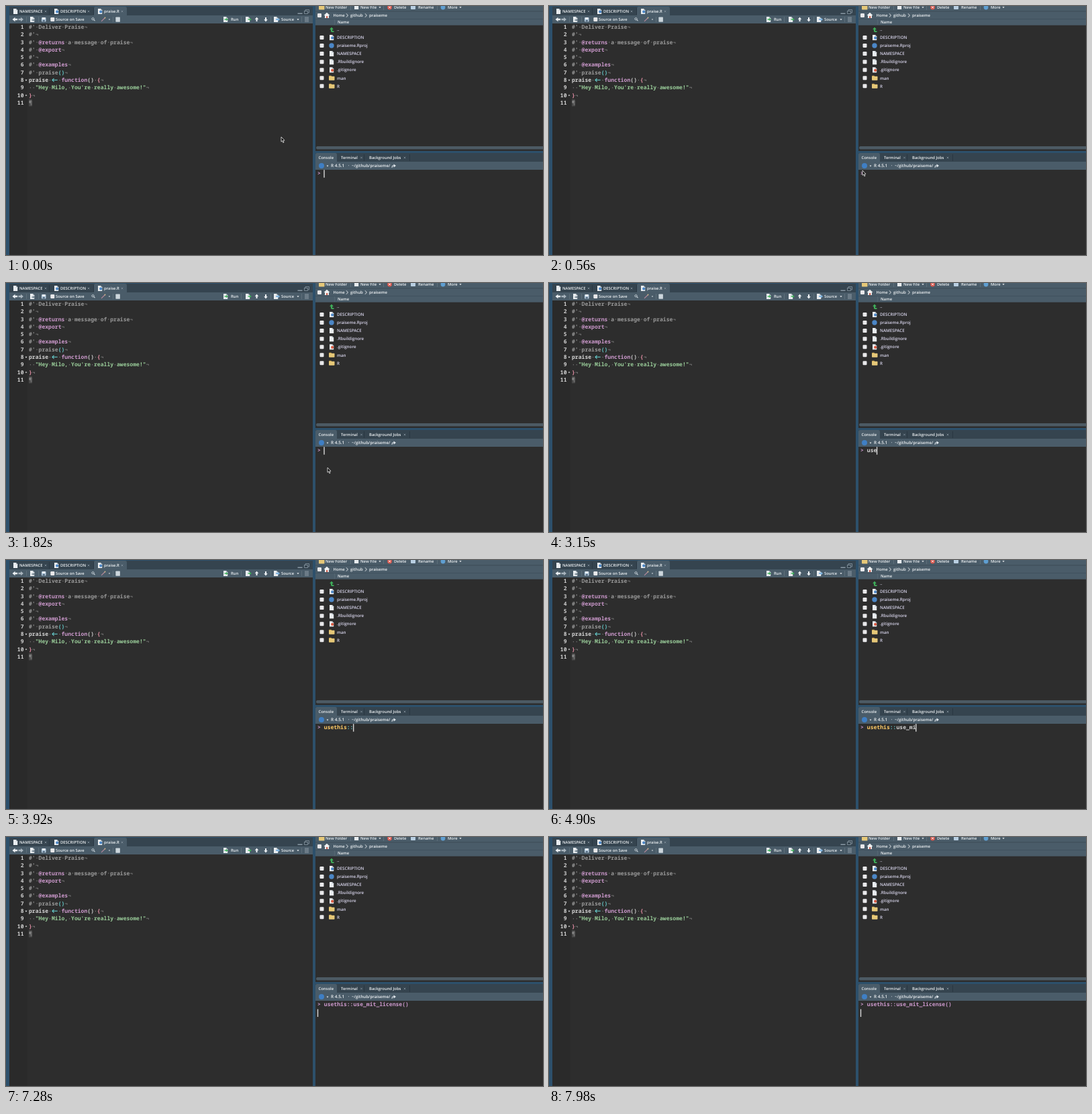
Recreate the animation shown at these times as an HTML page with a canvas. Size 800 by 371 pixels, loop 8000 ms.

```html
<!DOCTYPE html>
<html lang="en">
<head>
<meta charset="utf-8">
<title>Package console</title>
<style>
html, body { margin: 0; width: 100%; height: 100%; overflow: hidden; background: #2d2d2d; }
canvas { display: block; width: 800px; height: 371px; }
</style>
</head>
<body>
<canvas id="stage" width="800" height="371"></canvas>
<script>
const LOOP = 8000, TICK = 70;
const CHAR = 4.85, LINE = 11.3;
const MONO = '600 8.08px "Noto Sans Mono", monospace';
const SANS = '"Open Sans", sans-serif';
const C = {
  frame: '#2d506b', strip: '#35444f', bar: '#4a5c69', pane: '#2d2d2d', gutter: '#2a2a2a',
  text: '#d4d4d4', comment: '#999999', key: '#cc99cc', string: '#99cc99', op: '#66cccc',
  call: '#6699cc', ns: '#ffcc66', brace: '#e58fa5', mark: '#7a7a7a', label: '#f0f3f5',
  file: '#dad7ee', blue: '#4b86c6', red: '#d9573f', folder: '#e6c878', green: '#3fae5a'
};

const code = [
  [['comment', "#' Deliver Praise"]],
  [['comment', "#'"]],
  [['comment', "#' "], ['key', '@returns'], ['comment', ' a message of praise']],
  [['comment', "#' "], ['key', '@export']],
  [['comment', "#'"]],
  [['comment', "#' "], ['key', '@examples']],
  [['comment', "#' praise"], ['op', '()']],
  [['text', 'praise '], ['op', '<-'], ['key', ' function'], ['text', '() '], ['brace', '{']],
  [['string', '  "Hey Milo, You\'re really awesome!"']],
  [['brace', '}']]
];

const files = [
  ['DESCRIPTION', 'doc', C.blue], ['praiseme.Rproj', 'dot', C.blue], ['NAMESPACE', 'doc'],
  ['.Rbuildignore', 'doc'], ['.gitignore', 'doc', C.red], ['man', 'folder'], ['R', 'folder']
];

// Moments at which each typed character appears
const COMMAND = 'usethis::use_mit_license()';
const keys = [2870, 2940, 3150, 3220, 3290, 3360, 3430, 3640, 3850, 4200, 4270, 4480, 4620, 4830, 4900];
const COMPLETE = 6230, ENTER = 7280;
const idleBlinks = [5320, 5530, 6020, 6230, 6580, 7000, 7630, 7980];
const path = [[0, 410, 195], [70, 412, 197], [280, 460, 238], [420, 462, 240], [560, 467, 245], [840, 479, 275]];

const canvas = document.getElementById('stage');
let g = canvas.getContext('2d');

function rect(x, y, w, h, color) {
  g.fillStyle = color;
  g.fillRect(x, y, w, h);
}

function round(x, y, w, h, r, color) {
  g.fillStyle = color;
  g.beginPath();
  g.roundRect(x, y, w, h, r);
  g.fill();
}

function dot(x, y, r, color) {
  g.fillStyle = color;
  g.beginPath();
  g.arc(x, y, r, 0, 7);
  g.fill();
}

function poly(color, ...p) {
  g.fillStyle = color;
  g.beginPath();
  for (let i = 0; i < p.length; i += 2) g.lineTo(p[i], p[i + 1]);
  g.fill();
}

function line(color, width, ...p) {
  g.strokeStyle = color;
  g.lineWidth = width;
  g.beginPath();
  for (let i = 0; i < p.length; i += 2) g.lineTo(p[i], p[i + 1]);
  g.stroke();
}

function label(s, x, y, size = 5.9, color = C.label) {
  g.font = `600 ${size}px ${SANS}`;
  g.fillStyle = color;
  g.fillText(s, x, y + size * 0.36);
}

function mono(s, x, y, color) {
  g.font = MONO;
  g.fillStyle = color;
  [...s].forEach((ch, i) => {
    if (ch !== ' ') g.fillText(ch, x + i * CHAR, y + 2.7);
  });
}

function arrow(x, y, angle, color, s = 1) {
  g.save();
  g.translate(x, y);
  g.rotate(angle);
  g.scale(s, s);
  poly(color, 4, 0, 0, -3.2, 0, -1.2, -3.6, -1.2, -3.6, 1.2, 0, 1.2, 0, 3.2);
  g.restore();
}

function doc(x, y, badge) {
  poly('#e9edf0', x - 3, y - 4, x + 1, y - 4, x + 3.2, y - 1.8, x + 3.2, y + 4, x - 3, y + 4);
  poly('#a9b3bb', x + 1, y - 4, x + 3.2, y - 1.8, x + 1, y - 1.8);
  if (badge) dot(x + 1.2, y + 0.6, 2.1, badge);
}

function folder(x, y) {
  round(x - 4, y - 3.5, 4, 3, 0.8, '#cfa94f');
  round(x - 4, y - 2.5, 8.5, 6, 0.8, C.folder);
}

const drop = (x, y, s = 1.6) => poly(C.label, x - s, y - s / 2, x + s, y - s / 2, x, y + s / 2 + 0.4);
const box = (x, y) => round(x - 3, y - 3, 6, 6, 1.2, '#e8e8ea');
const cross = (x, y) => {
  line('#82909b', 0.8, x - 1.3, y - 1.3, x + 1.3, y + 1.3);
  line('#82909b', 0.8, x - 1.3, y + 1.3, x + 1.3, y - 1.3);
};
const divider = (x, y) => rect(x, y - 4, 0.7, 8, '#687883');
const rows = (x, y, color) => {
  for (let i = -3; i <= 3; i += 2) rect(x - 3, y + i - 0.4, 6, 0.9, color);
};

function tab(x, y, w, active) {
  g.fillStyle = active ? C.bar : C.strip;
  g.beginPath();
  g.roundRect(x, y, w, 13, [2.5, 2.5, 0, 0]);
  g.fill();
  if (!active) rect(x + w - 0.7, y + 2, 0.7, 10, '#25333d');
}

function editorBars() {
  rect(5, 1, 452, 13, C.strip);
  tab(7, 1, 58, false);
  tab(65, 1, 66, false);
  tab(131, 1, 49, true);
  doc(14, 8);
  label('NAMESPACE', 20, 7.6);
  cross(59, 8);
  doc(75, 8, C.blue);
  label('DESCRIPTION', 81, 7.6);
  cross(123, 8);
  doc(140, 8, C.blue);
  label('praise.R', 146, 7.6);
  cross(173, 8);
  rect(434.5, 10.5, 7, 1.5, '#8998a4');
  line('#8998a4', 0.8, 446, 7, 446, 5.5, 451.5, 5.5, 451.5, 10, 450, 10);
  line('#8998a4', 0.8, 444.5, 7.5, 449.5, 7.5, 449.5, 11.5, 444.5, 11.5, 444.5, 7);

  rect(5, 14, 452, 12, C.bar);
  arrow(13.5, 20, Math.PI, '#eef2f5');
  arrow(22, 20, 0, '#a8b4bd');
  divider(30, 20);
  doc(39, 20);
  arrow(40.5, 21, 0, '#6d7f8b', 0.6);
  divider(48, 20);
  round(53, 17, 6.5, 6.5, 1, '#b9cfe2');
  rect(54.3, 17.3, 4, 2.2, '#f7fafc');
  rect(54.6, 20.8, 3.3, 2.7, '#5b7185');
  box(69.3, 20);
  label('Source on Save', 74, 19.8, 5.85);
  g.strokeStyle = '#d5dde3';
  g.lineWidth = 0.9;
  g.beginPath();
  g.arc(129.5, 19.2, 1.6, 0, 7);
  g.stroke();
  line('#d5dde3', 1.1, 130.7, 20.4, 132.5, 22.2);
  line('#b98a9c', 1.1, 142, 22.8, 147, 18);
  dot(147.5, 17.5, 0.9, '#d8c08a');
  drop(154, 20, 1.2);
  divider(159, 20);
  round(163.5, 16.7, 6.3, 6.8, 0.6, '#dce3e8');
  rows(166.7, 20, '#b9c5ce');

  doc(327, 20);
  arrow(328, 20, 0, C.green, 0.7);
  label('Run', 335, 19.8);
  divider(350, 20);
  doc(360, 20);
  arrow(363, 20, 0, C.green, 0.7);
  arrow(373.5, 20, -Math.PI / 2, '#eef2f5', 0.85);
  arrow(387, 20, Math.PI / 2, '#eef2f5', 0.85);
  divider(394, 20);
  doc(402, 20);
  arrow(405, 20, 0, '#7fb2dc', 0.8);
  label('Source', 410, 19.8, 5.8);
  drop(435, 20);
  divider(440, 20);
  rows(448, 20, '#93a1ac');
}

function editor() {
  rect(5, 26, 452, 345, C.pane);
  rect(5, 26, 27, 345, C.gutter);
  for (let n = 1; n <= 11; n++) {
    const y = 31.2 + (n - 1) * LINE, s = String(n);
    mono(s, 26.5 - s.length * CHAR, y, '#d0d0d0');
    if (n === 11) break;
    let col = 0;
    for (const [kind, s] of code[n - 1]) {
      const x = 34 + col * CHAR;
      if (s === '<-') {
        line(C.op, 1.1, x + 1, y, x + 8.8, y);
        line(C.op, 1.1, x + 3.6, y - 2.5, x + 1, y, x + 3.6, y + 2.5);
      } else {
        mono(s, x, y, C[kind]);
        [...s].forEach((ch, i) => {
          if (ch === ' ') rect(x + i * CHAR + 1.8, y - 0.4, 1.2, 1.2, C.mark);
        });
      }
      col += s.length;
    }
    mono('¬', 34 + col * CHAR, y, C.mark);
  }
  drop(30, 110.5, 1.5);
  poly('#cfcfcf', 28.5, 133.8, 31.5, 133.8, 30, 131.8);
  rect(34, 139, 4.8, 10.5, '#474747');
  mono('¶', 34, 144.2, '#858585');
}

function filesPane() {
  rect(461, 0, 339, 216, C.pane);
  rect(461, 0, 339, 28.7, C.bar);
  rect(461, 7.5, 339, 0.8, '#384853');
  folder(470, 2);
  label('New Folder', 476, 1.8);
  divider(513, 2);
  doc(522, 1);
  label('New File', 528, 1.8);
  drop(557, 2);
  divider(562, 2);
  dot(571.5, 2, 3.4, '#d85349');
  line('#ffffff', 1, 570, 0.5, 573, 3.5);
  line('#ffffff', 1, 570, 3.5, 573, 0.5);
  label('Delete', 578, 1.8);
  round(603, -2, 7, 7, 1, '#b9cfe2');
  label('Rename', 614, 1.8);
  divider(642, 2);
  dot(651, 2, 3.4, '#5f9fd2');
  label('More', 658, 1.8, 5.8);
  drop(677, 2);

  box(467, 14);
  poly('#f0f1f2', 473.5, 14, 478, 9.8, 482.5, 14, 481, 14, 481, 18, 475, 18, 475, 14);
  rect(477, 15, 2.3, 3, '#cc6253');
  label('Home', 487.5, 13.6);
  label('github', 513, 13.6, 6);
  label('praiseme', 541, 13.6, 6);
  for (const x of [508, 536]) line(C.label, 0.9, x - 1, 11.3, x + 1.4, 14, x - 1, 16.7);

  rect(461, 19, 339, 0.7, '#3d4d59');
  rect(489, 20, 0.7, 8, '#5b6b77');
  label('Name', 494, 23.8);
  arrow(485, 35, -Math.PI / 2, C.green, 0.9);
  line(C.green, 1.8, 485, 38, 488.5, 38);
  label('..', 493, 35, 6.3, C.file);
  files.forEach(([name, icon, color], i) => {
    const y = 47 + i * 12.05;
    box(470.5, y);
    if (icon === 'folder') folder(485, y);
    else if (icon === 'dot') dot(485, y, 3.7, color);
    else doc(485, y, color);
    label(name, 493, y, 6.25, C.file);
  });
  round(462, 209, 340, 4.5, 2, '#4c5a64');
}

function consoleBars() {
  rect(461, 219, 339, 13, C.strip);
  tab(461, 219, 32, true);
  tab(493, 219, 41, false);
  tab(534, 219, 68, false);
  label('Console', 465.5, 225.6);
  label('Terminal', 499, 225.6);
  cross(529.5, 226);
  label('Background Jobs', 541, 225.6);
  cross(594, 226);
  rect(461, 232, 339, 12, C.bar);
  dot(470, 238, 4, '#3f7fc4');
  drop(479, 238.3, 1.4);
  label('R 4.5.1', 484, 238, 6.4);
  label('·', 509.5, 238, 6.4);
  label('~/github/praiseme/', 515, 238, 6.15);
  line('#dfe6eb', 1, 575, 241, 575.5, 238, 578, 238);
  poly('#dfe6eb', 577.5, 235.5, 581, 238, 577.5, 240.5);
  rect(461, 244, 339, 127, C.pane);
}

function pointer(t) {
  let i = 1;
  while (i < path.length - 1 && t > path[i][0]) i++;
  const [t0, x0, y0] = path[i - 1], [t1, x1, y1] = path[i];
  const k = Math.min(1, (t - t0) / (t1 - t0));
  g.save();
  g.translate(x0 + (x1 - x0) * k, y0 + (y1 - y0) * k);
  const shape = [0, 0, 0, 7.2, 1.6, 5.8, 2.8, 8.6, 4, 8.1, 2.8, 5.4, 4.9, 5.2, 0, 0];
  poly('#0a0a0a', ...shape);
  line('#f2f2f2', 0.8, ...shape);
  g.restore();
}

function caretOn(t) {
  if (t < keys[0]) return Math.floor((t - 1820) / 490) % 2 === 0;
  if (t >= ENTER && t < 7630) return true;
  return idleBlinks.filter(b => b <= t).length % 2 === 0;
}

const caret = (x, y) => rect(x - 0.5, y, 1.4, 11.5, '#d8d8d8');

function prompt(t) {
  const x = 473.8, y = 249.6;
  mono('>', 464.1, y, C.key);
  if (t >= ENTER) {
    mono(COMMAND, x, y, C.key);
    if (caretOn(t)) caret(464.3, 256.5);
    return;
  }
  const done = t >= COMPLETE;
  const n = done ? COMMAND.length : keys.filter(k => k <= t).length;
  const at = done ? n - 1 : n;
  if (done) rect(x + (n - 2) * CHAR, 244.5, 2 * CHAR, 11, '#6a5453');
  const paint = (from, to, color) => mono(COMMAND.slice(from, Math.min(to, n)), x + from * CHAR, y, color);
  paint(0, 7, n >= 9 ? C.ns : C.text);
  if (n > 7) paint(7, 9, C.op);
  if (n > 9) paint(9, 24, done ? C.call : C.text);
  if (done) paint(24, 26, '#d8c4c4');
  if (caretOn(t)) caret(x + at * CHAR, 244.2);
}

// The still parts are painted once
const still = document.createElement('canvas');
still.width = canvas.width;
still.height = canvas.height;
const screen = g;
const back = still.getContext('2d');
for (const ctx of [screen, back]) ctx.textRendering = 'geometricPrecision';
g = back;
rect(0, 0, 800, 371, C.frame);
editorBars();
editor();
filesPane();
consoleBars();
g = screen;

function draw(now) {
  const t = Math.floor((now % LOOP) / TICK) * TICK;
  g.drawImage(still, 0, 0);
  prompt(t);
  if (t < keys[0]) pointer(t);
}

const start = performance.now();
function frame() {
  draw(performance.now() - start);
  requestAnimationFrame(frame);
}
frame();
</script>
</body>
</html>
```
